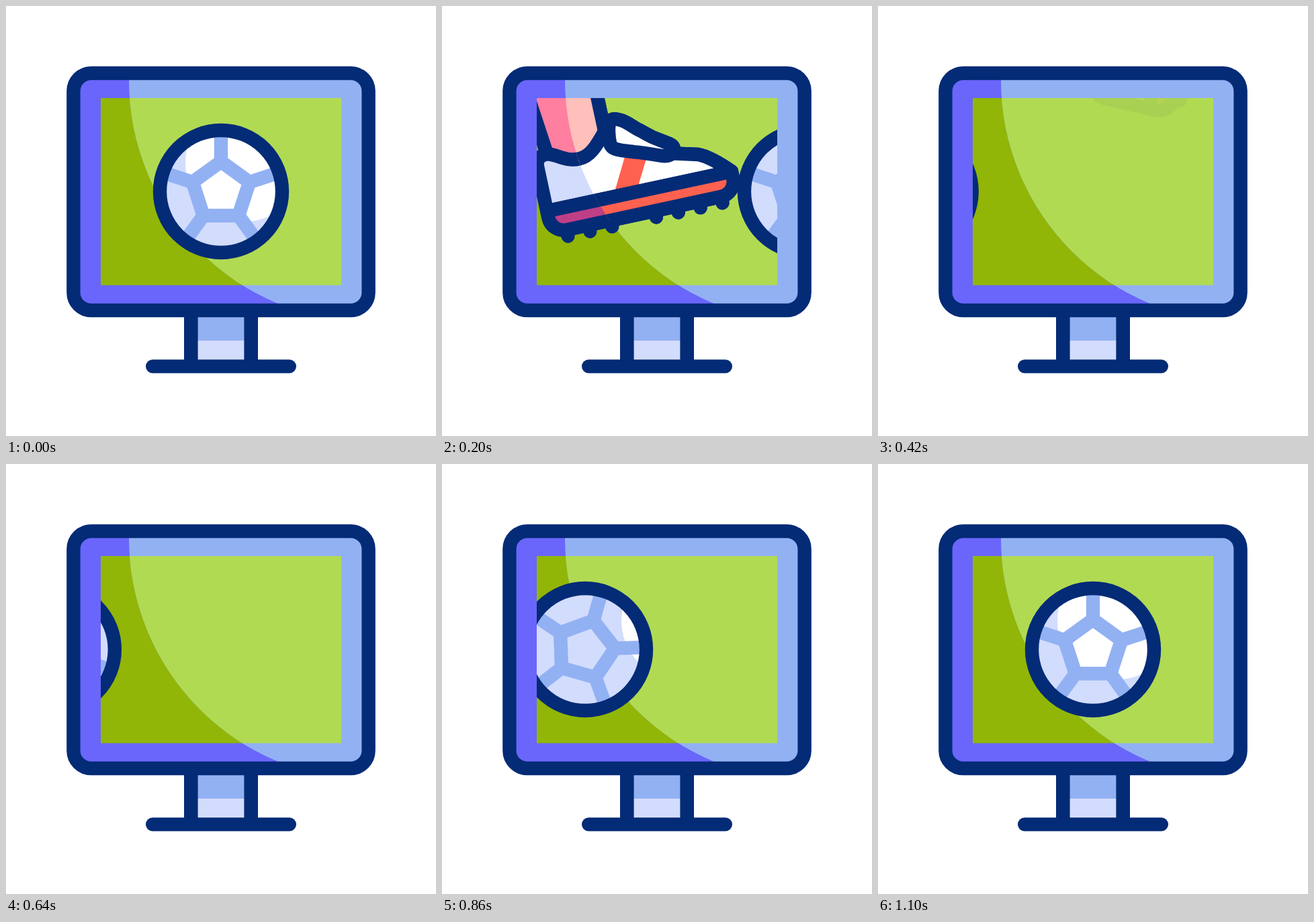
An HTML page with a canvas for the animation above (1.6 s loop, 640 by 640 pixels).

```html
<!DOCTYPE html>
<html lang="en">
<head>
<meta charset="utf-8">
<title>Football on screen</title>
<style>
  html, body { margin: 0; width: 100%; height: 100%; overflow: hidden; background: #fff; }
  canvas { display: block; width: 100vw; height: 100vh; }
</style>
</head>
<body>
<canvas id="stage" width="640" height="640"></canvas>
<script>
const LOOP = 1600, STEP = 20, LINE = 20.4, RAD = Math.PI / 180;
const NAVY = '#042b76', BLUE = '#92b1f3', PALE = '#d2dcfd';
const SHADE = { bezel: '#6a66fb', grass: '#91b607', skin: '#ff7fa1', shoe: PALE, trim: '#bf3f87' };
const LIGHT = { bezel: BLUE, grass: '#b1da53', skin: '#ffbfba', shoe: '#ffffff', trim: '#ff6150' };

const KNEE = { x: 159.5, y: 35 };
const BALL_Y = 276, BALL_REST = 320, BALL_ENTRY = 48.7;
const KICK = 116, KICK_SPEED = 2.63, SWING_END = 420, ROLL_START = 600, ROLL_END = 1100;

const stage = document.getElementById('stage').getContext('2d');
const layerCanvas = document.createElement('canvas');
layerCanvas.width = layerCanvas.height = 640;
const layer = layerCanvas.getContext('2d');

const clamp = (v, lo, hi) => Math.min(hi, Math.max(lo, v));

function outline(c, width = LINE, color = NAVY) {
  c.lineWidth = width;
  c.strokeStyle = color;
  c.stroke();
}

function disc(c, x, y, r, color) {
  c.beginPath();
  c.arc(x, y, r, 0, Math.PI * 2);
  if (color) {
    c.fillStyle = color;
    c.fill();
  }
}

function rect(c, x, y, w, h, color) {
  c.fillStyle = color;
  c.fillRect(x, y, w, h);
}

function clipScreen(c) {
  c.beginPath();
  c.rect(141, 137, 358, 278.5);
  c.clip();
}

// Paint once in shade, then again in light inside the big glare circle.
function twoTone(c, paint) {
  paint(SHADE);
  c.save();
  disc(c, 544, 110, 361);
  c.clip();
  paint(LIGHT);
  c.restore();
}

function drawMonitor(c) {
  rect(c, 275, 455, 90, 43, BLUE);
  rect(c, 275, 498, 90, 34, PALE);
  rect(c, 265, 455, 20.6, 78, NAVY);
  rect(c, 354.4, 455, 20.6, 78, NAVY);
  c.lineCap = 'round';
  c.beginPath();
  c.moveTo(218.2, 536.4);
  c.lineTo(421.8, 536.4);
  outline(c);
  c.lineCap = 'butt';

  const body = () => {
    c.beginPath();
    c.roundRect(100.4, 100, 439.2, 353, 26.5);
  };
  c.save();
  body();
  c.clip();
  twoTone(c, tone => {
    rect(c, 100, 100, 440, 354, tone.bezel);
    rect(c, 141, 137, 358, 278.5, tone.grass);
  });
  c.restore();
  body();
  outline(c);
}

function drawBall(c, x, turn) {
  c.save();
  disc(c, x, BALL_Y, 90, PALE);
  c.clip();
  disc(c, 355, 233, 88, '#fff');
  c.translate(x, BALL_Y);
  c.rotate(turn * RAD);
  const dirs = [0, 1, 2, 3, 4].map(i => (72 * i - 90) * RAD);
  c.beginPath();
  for (const a of dirs) c.lineTo(44.5 * Math.cos(a), 44.5 * Math.sin(a));
  c.closePath();
  for (const a of dirs) {
    c.moveTo(44.5 * Math.cos(a), 44.5 * Math.sin(a));
    c.lineTo(88 * Math.cos(a), 88 * Math.sin(a));
  }
  outline(c, LINE, BLUE);
  c.restore();
  disc(c, x, BALL_Y, 91);
  outline(c);
}

const LEG = new Path2D('M-236 -120L-262 -330H-149V-135L-195 -104Z');
const LEG_LINES = new Path2D('M-240 -125L-262 -330M-149 -330V-138');
const SHOE = new Path2D('M-258 -43V-110Q-258 -126 -240 -126C-224 -122 -216 -109 -195 -109' +
  'C-178 -109 -166 -122 -150 -140L-137 -111L-113 -102L-62 -89L-20 -78Q-2 -70 23 -43Z');
const BAND = new Path2D('M-153.5 -50L-120 -112L-86 -108L-118 -50Z');
const FLAP = new Path2D('M-138 -155C-132 -158 -125 -154 -120 -151C-110 -144 -105 -137 -97 -131' +
  'C-90 -125 -86 -121 -79 -116L-58 -102Q-51 -97 -56 -90Q-62 -83 -75 -88' +
  'C-90 -94 -100 -98 -113 -102C-122 -105 -130 -107 -137 -111Q-145 -115 -145 -122C-145 -132 -143 -147 -138 -155Z');
const SOLE = new Path2D();
SOLE.roundRect(-258, -43, 281, 33.5, [0, 0, 23, 23]);
const STUDS = [0, 1, 2, 3, 5, 6, 7].map(i => -33.6 * i);

function paintBoot(c, tone) {
  const shape = (path, color, edge) => {
    c.fillStyle = color;
    c.fill(path);
    if (edge) c.stroke(path);
  };
  c.lineWidth = LINE;
  c.strokeStyle = NAVY;
  c.lineJoin = 'round';
  shape(LEG, tone.skin);
  c.stroke(LEG_LINES);
  shape(SHOE, tone.shoe);
  shape(BAND, tone.trim);
  c.stroke(SHOE);
  for (const x of STUDS) disc(c, x, 0, 10.2, NAVY);
  shape(SOLE, tone.trim, true);
  shape(FLAP, tone.shoe, true);
}

function drawBoot(c, angle, alpha) {
  layer.clearRect(0, 0, 640, 640);
  twoTone(layer, tone => {
    layer.save();
    layer.translate(KNEE.x, KNEE.y);
    layer.rotate(angle * RAD);
    layer.translate(198, 306.5);
    paintBoot(layer, tone);
    layer.restore();
  });
  c.globalAlpha = alpha;
  c.drawImage(layerCanvas, 0, 0);
  c.globalAlpha = 1;
}

function bootAngle(t) {
  const d = Math.min(t, SWING_END) - 140;
  return 12 - 0.425 * d + 0.0003815 * d * d;
}

function ballX(t) {
  if (t < SWING_END) return BALL_REST + KICK_SPEED * Math.max(0, t - KICK);
  const u = clamp((t - ROLL_START) / (ROLL_END - ROLL_START), 0, 1), v = 1 - u;
  const p = 3 * v * v * u * 0.321 + 3 * v * u * u * 0.898 + u * u * u;
  return BALL_ENTRY + (BALL_REST - BALL_ENTRY) * p;
}

function draw(t) {
  rect(stage, 0, 0, 640, 640, '#fff');
  drawMonitor(stage);
  stage.save();
  clipScreen(stage);
  if (t >= 40 && t <= ROLL_START) {
    const alpha = clamp((424 - Math.min(t, SWING_END)) / 84, 0, 1);
    drawBoot(stage, bootAngle(t), alpha);
  }
  const x = ballX(t);
  drawBall(stage, x, t < SWING_END ? 0 : (x - BALL_REST) * 1.87);
  stage.restore();
}

const start = performance.now();
function tick() {
  const t = (performance.now() - start) % LOOP;
  draw(Math.floor(t / STEP) * STEP);
  requestAnimationFrame(tick);
}
tick();
</script>
</body>
</html>
```
